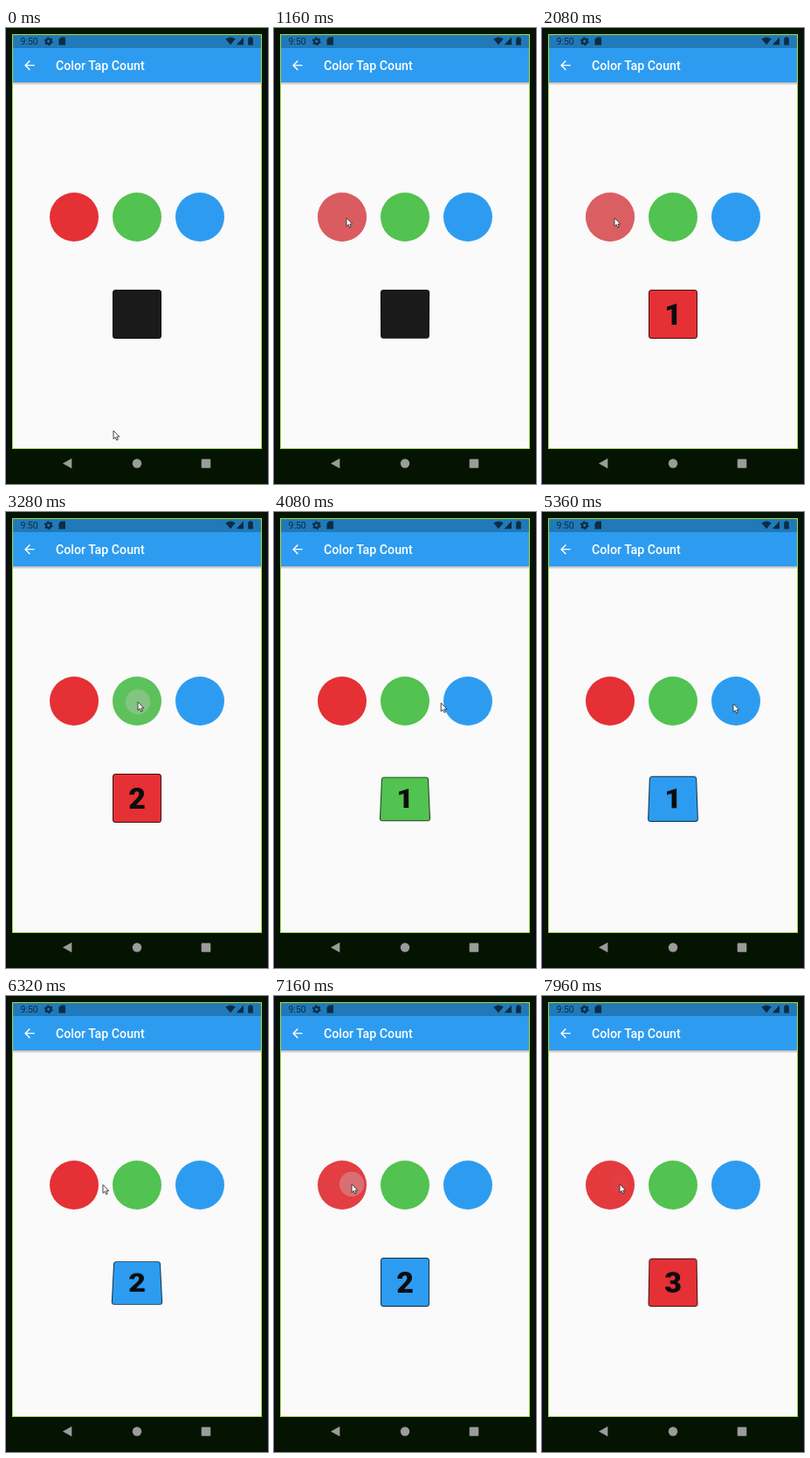
These frames come from a looping animation (300x521 px, 8000 ms). An HTML page:

```html
<!DOCTYPE html>
<html lang="en">
<head>
<meta charset="utf-8">
<title>Color Tap Count</title>
<style>
  html, body { margin: 0; width: 100%; height: 100%; overflow: hidden; background: #051400; }
  svg { position: absolute; left: 0; top: 0; display: block; }
  text { font-family: Roboto, sans-serif; }
  #card {
    position: absolute; left: 122px; top: 299px; width: 56px; height: 56px;
    box-sizing: border-box; border: 1px solid rgba(0, 0, 0, .7); border-radius: 3.5px;
    font: 900 34px/54px Roboto, sans-serif; text-align: center; color: #0c0c0c;
  }
</style>
</head>
<body>
<svg width="300" height="521" viewBox="0 0 300 521">
  <defs>
    <linearGradient id="shade" x2="0" y2="1">
      <stop stop-color="#000" stop-opacity=".28"/>
      <stop offset="1" stop-color="#000" stop-opacity="0"/>
    </linearGradient>
  </defs>
  <rect width="300" height="521" fill="#051400"/>
  <path d="M0 0H2V521H0ZM298 0H300V521H298Z" fill="#0a0c1a"/>
  <rect x="7.5" y="7.5" width="285" height="473" fill="#fafafa"/>
  <rect x="8" y="8" width="284" height="15.5" fill="#2179b9"/>
  <rect x="8" y="23" width="284" height="39" fill="#2d9cf0"/>
  <rect x="8" y="62" width="284" height="3.5" fill="url(#shade)"/>
  <rect x="7.5" y="7.5" width="285" height="473" fill="none" stroke="#a4dc48"/>

  <g fill="#0d2c45">
    <text x="16.5" y="18.8" font-size="10.5">9:50</text>
    <circle cx="48.7" cy="15.2" r="2.7" fill="none" stroke="#0d2c45" stroke-width="2.2"/>
    <circle cx="48.7" cy="15.2" r="4.2" fill="none" stroke="#0d2c45" stroke-width="1.5" stroke-dasharray="2.2"/>
    <path d="M63 10.5H68V19.5H60.5V13Z"/>
    <path d="M251.3 12.6Q257 8.6 262.7 12.6L257 19.3Z"/>
    <path d="M272 10.5V19.3H263.7Z"/>
    <path d="M278.7 10.2H281.3V11.2H282.8V19.5H277.2V11.2H278.7Z"/>
  </g>
  <path transform="translate(18.2 34) scale(.72)" fill="#fff"
    d="M20 11H7.83l5.59-5.59L12 4l-8 8 8 8 1.41-1.41L7.83 13H20z"/>
  <text x="57" y="48" font-size="14.2" font-weight="500" fill="#fff">Color Tap Count</text>

  <g id="buttons"></g>

  <g fill="#9b9b9b">
    <path d="M65 497.5L75.3 491.7V503.3Z"/>
    <circle cx="150" cy="497.5" r="5.2"/>
    <rect x="223.7" y="492.4" width="10.6" height="10.4" rx="1"/>
  </g>
  <path id="cursor" d="M0 0V9.6L2.2 7.6L3.7 11L5.3 10.3L3.8 7H6.8Z"
    fill="#fff" stroke="#333" stroke-width=".9" stroke-linejoin="round"/>
</svg>
<div id="card"></div>

<script>
const LOOP = 8000, FLIP = 700, RADIUS = 28;
const colors = ['#e53035', '#52c250', '#2d9cf0'];

// Each tap: button index, press time, release time, count shown afterwards.
const taps = [
  { button: 0, down: 960, up: 1150, count: 1 },
  { button: 0, down: 1880, up: 2100, count: 2 },
  { button: 1, down: 3220, up: 3480, count: 1 },
  { button: 2, down: 4560, up: 4745, count: 1 },
  { button: 2, down: 5540, up: 5730, count: 2 },
  { button: 0, down: 7100, up: 7300, count: 3 },
  { button: 0, down: 7920, up: 8100, count: 4 }
];

// Each move: start, end, destination.
const origin = [123, 460];
const moves = [
  [250, 900, [83, 217]],
  [2450, 3050, [151, 217]],
  [3750, 4340, [219, 219]],
  [5900, 6470, [89, 215]]
];

const clamp = v => Math.max(0, Math.min(1, v));
const smooth = v => v * v * (3 - 2 * v);
const card = document.getElementById('card');
const cursor = document.getElementById('cursor');

document.getElementById('buttons').innerHTML = colors.map((color, i) => {
  const x = 78 + 72 * i;
  return `<clipPath id="clip${i}"><circle cx="${x}" cy="216" r="${RADIUS}"/></clipPath>
    <circle cx="${x}" cy="216" r="${RADIUS}" fill="${color}"/>
    <g clip-path="url(#clip${i})">
      <circle id="glow${i}" cx="${x}" cy="216" r="${RADIUS}" fill="#c0c0c0"/>
      <circle id="splash${i}" fill="#c8c8c8"/>
    </g>`;
}).join('');

function cursorAt(t) {
  return moves.reduce(([x, y], [start, end, to]) => {
    const k = smooth(clamp((t - start) / (end - start)));
    return [x + (to[0] - x) * k, y + (to[1] - y) * k];
  }, origin);
}

function drawInk(t, [x, y]) {
  colors.forEach((_, i) => {
    const glow = document.getElementById('glow' + i);
    const splash = document.getElementById('splash' + i);
    const tap = taps.filter(p => p.button === i && p.down <= t).pop();
    const age = tap ? t - tap.down : 0;
    const fade = tap ? 1 - clamp((t - tap.up) / 220) : 0;
    glow.setAttribute('opacity', .32 * clamp(age / 200) * fade);
    splash.setAttribute('cx', x);
    splash.setAttribute('cy', y);
    splash.setAttribute('r', 5 + Math.min(age, 300) * .15);
    splash.setAttribute('opacity', .36 * clamp((age - 40) / 20) * clamp((200 - age) / 140));
  });
}

function drawCard(t) {
  const index = taps.filter(p => p.up <= t).length - 1;
  const turn = index < 0 ? 1 : clamp((t - taps[index].up) / FLIP);
  const face = taps[turn < .5 ? index - 1 : index];
  const angle = turn < .5 ? -180 * turn : 180 * (1 - turn);
  card.textContent = face ? face.count : '';
  card.style.background = face ? colors[face.button] : '#1a1a1a';
  card.style.transform = `perspective(300px) rotateX(${angle}deg)`;
}

function draw(now) {
  const t = now % LOOP;
  const point = cursorAt(t);
  cursor.setAttribute('transform', `translate(${point})`);
  drawInk(t, point);
  drawCard(t);
}

const startTime = performance.now();
function frame() {
  draw(performance.now() - startTime);
  requestAnimationFrame(frame);
}
frame();
</script>
</body>
</html>
```
